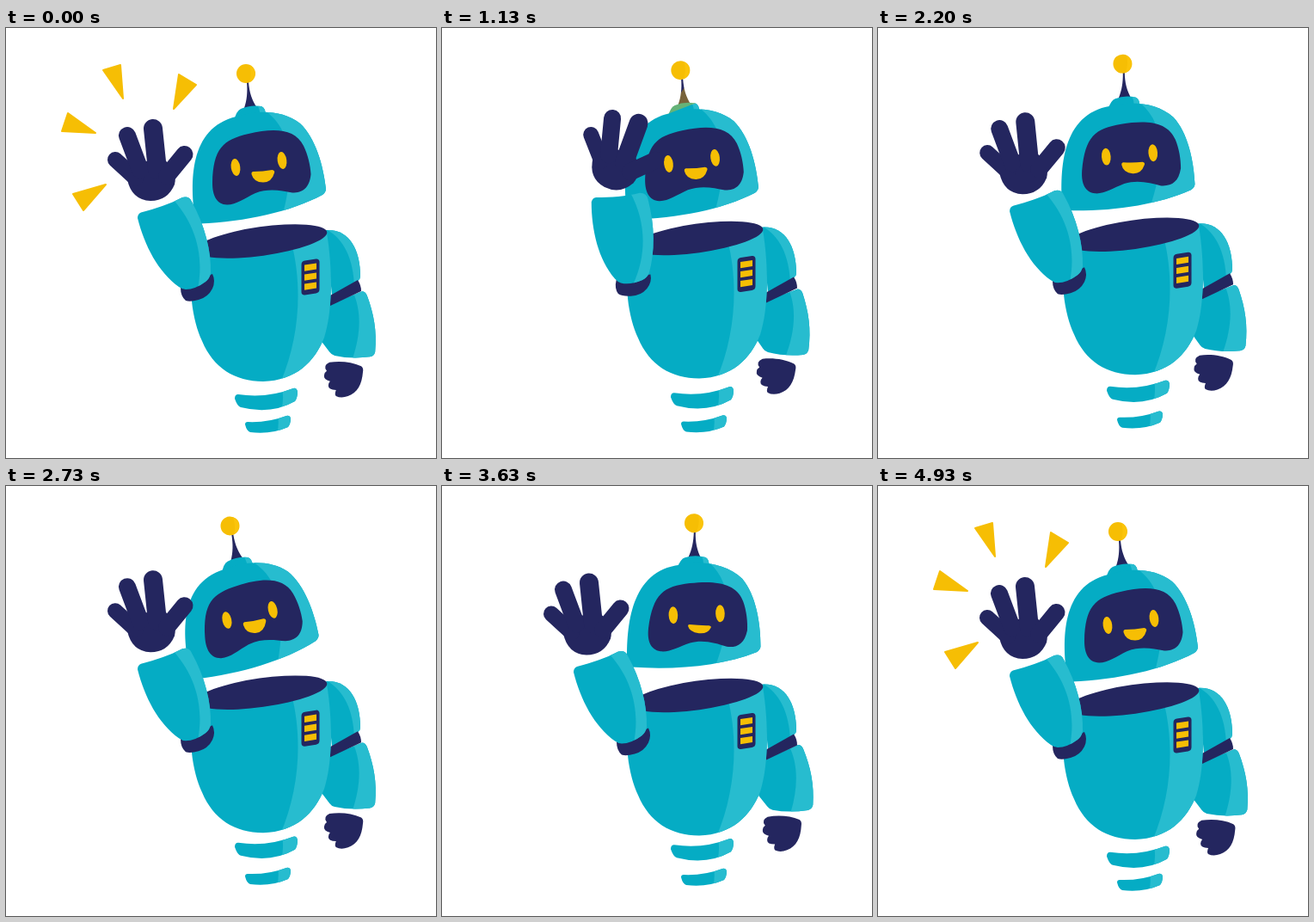
Animation of 500 by 500 pixels, one loop 5010 ms. Source, as an HTML page with a canvas:

```html
<!DOCTYPE html>
<html lang="en">
<head>
<meta charset="utf-8">
<title>Waving robot</title>
<style>
html, body { margin: 0; width: 100%; height: 100%; overflow: hidden; background: #fff; }
canvas { display: block; }
</style>
</head>
<body>
<canvas id="stage" width="500" height="500"></canvas>
<script>
const ctx = document.getElementById('stage').getContext('2d');
const TEAL = '#05acc4', LIGHT = '#27bccf', NAVY = '#24265f', YELLOW = '#f6be04';
const LOOP = 5010, STEPS = 100, RAD = Math.PI / 180;

// step, forearm angle, hand angle
const ARM = [[0, 0, 0], [9, 0, 0], [12, .6, 1], [22, 13.8, 25.8], [23, 14, 26], [28, 3.8, 11],
  [31, 14.2, 27], [34, 8, 19], [38, 3, 7], [42, .5, 1], [45, 0, 0], [100, 0, 0]];
// step, tilt, dx, dy, mouth height
const HEAD = [[0, 0, 0, 0, 1], [23, 1, -4.6, 0, 1], [34, 4.2, -5.7, -.6, 1], [40, 5.5, -5.7, -3, .95],
  [55, -4.4, -5.6, -.9, 1.1], [66, 6, -5, -4, .8], [73, 6.4, -5, -4, .7], [84, -.5, -2.4, -1, 1], [100, 0, 0, 0, 1]];

const SPARKS = 'M113 49L133 43L136 82ZM72 99L65 120L104 122ZM78 193L90 212L116 182ZM201 54L221 66L195 94Z';

// Smooth, non-overshooting interpolation of one column of a key table
function track(keys, step, col) {
  const rise = i => keys[i + 1] && keys[i] ? (keys[i + 1][col] - keys[i][col]) / (keys[i + 1][0] - keys[i][0]) : 0;
  const slope = i => {
    const a = rise(i - 1), b = rise(i);
    return a * b > 0 ? 2 * a * b / (a + b) : 0;
  };
  let i = 0;
  while (i < keys.length - 2 && step >= keys[i + 1][0]) i++;
  const span = keys[i + 1][0] - keys[i][0], u = (step - keys[i][0]) / span;
  const p = keys[i][col], q = keys[i + 1][col], ease = u * u * (3 - 2 * u);
  return p + (q - p) * ease + span * u * (1 - u) * (slope(i) * (1 - u) - slope(i + 1) * u);
}

function fill(d, color) {
  ctx.fillStyle = color;
  ctx.fill(new Path2D(d));
}

function lit(d, shine) {
  fill(d, TEAL);
  ctx.save();
  ctx.clip(new Path2D(d));
  fill(shine, LIGHT);
  ctx.restore();
}

function ellipse(x, y, rx, ry, deg, color) {
  ctx.beginPath();
  ctx.ellipse(x, y, rx, ry, deg * RAD, 0, 7);
  ctx.fillStyle = color;
  ctx.fill();
}

function line(x1, y1, x2, y2, width) {
  ctx.beginPath();
  ctx.moveTo(x1, y1);
  ctx.lineTo(x2, y2);
  ctx.lineWidth = width;
  ctx.stroke();
}

function rotate(deg, x, y) {
  ctx.translate(x, y);
  ctx.rotate(deg * RAD);
  ctx.translate(-x, -y);
}

function group(dx, dy, draw) {
  ctx.save();
  ctx.translate(dx, dy);
  draw();
  ctx.restore();
}

function rightArm(swing) {
  lit('M372 235C398 233 412 256 412 289Q412 292 409 294L379 311Z',
    'M372 234C392 244 404 268 405 300L420 290V230Z');
  ctx.save();
  rotate(swing, 392, 300);
  lit('M376 322L414 306Q418 306 420 311C428 332 432 352 430 376Q429 381 424 382Q402 385 383 381Q379 380 377 377L367 364Z',
    'M402 304C416 330 412 362 402 390H440V300Z');
  fill('M377 389C389 387 403 388 414 393Q417 395 416 400C415 414 410 424 399 428Q391 431 385 428Q383 426 385 421'
    + 'Q376 421 376 416Q376 413 378 411Q370 409 371 404Q371 401 374 399Q369 393 377 389Z', NAVY);
  ctx.restore();
  fill('M377 311L409 293Q413 299 413 306L377 323Z', NAVY);
}

function body() {
  lit('M220 260C210 300 217 340 228 364C241 395 266 411 299 411C337 410 359 388 370 360C380 330 380 280 373 238Z',
    'M332 250C346 305 340 365 318 415H390V235Z');
  ellipse(297, 248, 77, 16.8, -8, NAVY);
  group(354, 289, () => {
    ctx.transform(1, Math.tan(-9 * RAD), 0, 1, 0, 0);
    ctx.fillStyle = NAVY;
    ctx.beginPath();
    ctx.roundRect(-10.5, -19.5, 21, 40, 4);
    ctx.fill();
    ctx.fillStyle = YELLOW;
    for (const y of [-14.5, -3.5, 7.5]) ctx.fillRect(-7, y, 14, 7.2);
  });
}

function head(grin) {
  fill('M280 63H282C283 75 286 84 292 93H277C280 84 281 75 280 63Z', NAVY);
  ellipse(279, 53, 11, 11, 0, YELLOW);
  fill('M283 43A11 11 0 0 1 283 63Q286 53 283 43Z', '#fbc40a');
  lit('M265 108Q268 96 273 94Q284 89 297 91Q302 93 302 102Z', 'M291 88Q297 96 295 108H306V88Z');
  lit('M220 224C214 180 212 116 268 103C290 95 322 95 342 111C360 128 369 160 372 187Q372 191 368 194C330 214 280 225 225 227.5Q221 228 220 224Z',
    'M298 94C333 116 337 160 321 220H380V90Z');
  fill('M240 180C241 140 252 130 282 123C312 116 336 117 346 137C351 147 354 160 354.500 170C353 186 345 191.500 333 191.500'
    + 'C320 189 305 186 290 192C277 198 268 205.500 257 205.500C245 205 240 195 240 180Z', NAVY);
  ellipse(267, 162, 5.3, 10, -8, YELLOW);
  ellipse(321, 154, 5.3, 10, -8, YELLOW);
  group(0, 179.5, () => {
    ctx.scale(1, grin);
    fill('M287 -12.500Q299 -12.500 309.500 -14.500Q313 -14 312 -11Q309 0 299 0Q288 0 285.500 -9.500Q285 -12 287 -12.500Z', YELLOW);
  });
}

function forearm() {
  fill('M203 302L240 286Q244 294 240 303Q235 313 224 316Q214 319 209 317Q203 312 203 302Z', NAVY);
  lit('M157 214.500C174 210 190 205 205 197Q213 195 216 202C231 229 239 260 238 285Q237 291 232 295Q220 304 209 304Q205 304 201 301'
    + 'C177 284 161 253 153 221Q153 216 157 214.500Z',
    'M190 195C220 225 232 265 222 308H250V190Z');
}

function hand() {
  fill('M141 176Q139 161 152 156L184 153Q200 166 196 182Q188 201 168 201Q146 200 141 176Z', NAVY);
  ctx.strokeStyle = NAVY;
  ctx.lineCap = 'round';
  line(127, 153, 151, 175, 18);
  line(141, 125, 156, 165, 20);
  line(171, 117, 176, 165, 22);
  line(207.5, 147, 187, 172, 20);
}

function sparks(glow) {
  ctx.fillStyle = ctx.strokeStyle = YELLOW;
  ctx.lineWidth = 2;
  ctx.lineJoin = 'round';
  const path = new Path2D(SPARKS);
  // Tint whatever lies underneath; on bare paper a spark is either solid or absent
  ctx.globalAlpha = glow;
  ctx.globalCompositeOperation = 'source-atop';
  ctx.fill(path);
  if (glow > .5) {
    ctx.globalAlpha = 1;
    ctx.globalCompositeOperation = 'destination-over';
    ctx.fill(path);
    ctx.stroke(path);
  }
}

function render(step) {
  const turn = step / STEPS * 360;
  const wave = (amp, lag) => amp * Math.cos((turn - lag) * RAD);
  const bob = wave(4, 0) - 4;
  const arm = col => track(ARM, step, col), pose = col => track(HEAD, step, col);

  ctx.clearRect(0, 0, 500, 500);
  group(0, wave(4, 36) - 3.2, () =>
    lit('M281 458Q305 459 326 451Q330 450 331 454Q331 460 328 464Q308 473 284 470Q280 469 278 461Q278 458 281 458Z',
      'M315 445Q319 460 314 476H340V445Z'));
  group(0, wave(6, 28) - 5.3, () =>
    lit('M270 426Q303 431 334 419Q338 418 339 423Q339 430 336 434Q308 450 273 441Q269 440 266 431Q266 426 270 426Z',
      'M320 415Q325 432 318 452H350V415Z'));
  group(0, bob, () => {
    rightArm(.9 + wave(2, 99));
    body();
  });
  group(pose(2), bob + pose(3), () => {
    rotate(pose(1), 300, 222);
    head(pose(4));
  });
  group(0, bob, () => {
    rotate(arm(1), 225, 298);
    forearm();
    rotate(arm(2) - arm(1), 168, 180);
    hand();
    sparks(Math.abs(step % 10 - 5) / 5);
  });
}

function frame() {
  const t = performance.now() % LOOP;
  // Two poses per 100 ms, the second starting 30 ms in
  const step = Math.min(STEPS - 1, 2 * Math.floor(t / 100) + (t % 100 >= 30 ? 1 : 0));
  render(step);
  requestAnimationFrame(frame);
}
frame();
</script>
</body>
</html>
```
